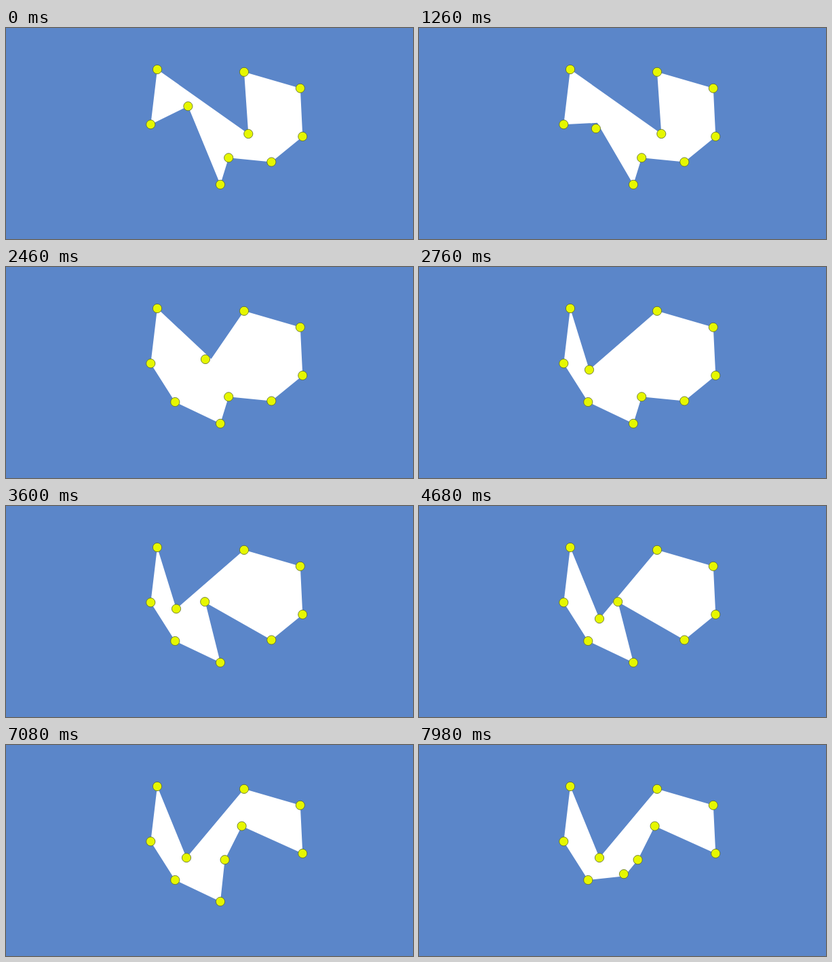
These frames come from a looping animation (600x311 px, 8 s). An HTML page:

```html
<!DOCTYPE html>
<html lang="en">
<head>
<meta charset="utf-8">
<title>Polygon with draggable corners</title>
<style>
  html, body { margin: 0; width: 100%; height: 100%; overflow: hidden; background: #5b86c9; }
  svg { display: block; width: 600px; height: 311px; }
  polygon { fill: #fff; }
  circle { fill: #e6f700; stroke: #56652f; stroke-width: 0.8; }
</style>
</head>
<body>
<svg viewBox="0 0 600 311"><polygon/></svg>
<script>
const LOOP = 8000, STEP = 60;
const FILL_LAG = 0.5; // steps by which the fill trails its handle

const corners = [
  [223, 61], [357.3, 156], [351, 64.8], [433.8, 88.8], [437.3, 159.9],
  [391.3, 197.5], [328.2, 191.3], [316, 230.8], [268.4, 115.3], [213.3, 142.2]
];

// Each drag eases one corner to a new place; lift bows its path upwards.
const drags = [
  { start: 1140, steps: 7, corner: 8, to: [249.3, 199] },
  { start: 2160, steps: 1, corner: 1, to: [354, 151.6] },
  { start: 2220, steps: 9, corner: 1, to: [251, 151.5], lift: 16 },
  { start: 3300, steps: 6, corner: 6, to: [293.2, 141.2] },
  { start: 4500, steps: 3, corner: 1, to: [266, 166.2] },
  { start: 5700, steps: 5, corner: 5, to: [349.4, 128.8] },
  { start: 6000, steps: 3, corner: 5, to: [347.6, 119.5] },
  { start: 6780, steps: 5, corner: 6, to: [322.6, 169.2] },
  { start: 7860, steps: 3, corner: 7, to: [302, 190.2] }
];

const shape = document.querySelector("polygon");
const dots = corners.map(() => {
  const dot = document.createElementNS("http://www.w3.org/2000/svg", "circle");
  dot.setAttribute("r", 6.6);
  return shape.parentNode.appendChild(dot);
});

const ease = u => u * u * (3 - 2 * u);
const mix = (a, b, k) => a + (b - a) * k;

function pose(time, lag) {
  const points = corners.slice();
  for (const { start, steps, corner, to, lift = 0 } of drags) {
    if (time < start) break;
    const step = Math.floor((time - start) / STEP) + 1 - lag;
    const k = ease(Math.min(step / steps, 1));
    const [x, y] = points[corner];
    points[corner] = [mix(x, to[0], k), mix(y, to[1], k) - lift * 4 * k * (1 - k)];
  }
  return points;
}

function draw(now) {
  const time = now % LOOP;
  pose(time, 0).forEach(([x, y], i) => {
    dots[i].setAttribute("cx", x);
    dots[i].setAttribute("cy", y);
  });
  shape.setAttribute("points", pose(time, FILL_LAG).join(" "));
}

let origin;
function tick(now) {
  origin ??= now;
  draw(now - origin);
  requestAnimationFrame(tick);
}
draw(0);
requestAnimationFrame(tick);
</script>
</body>
</html>
```
